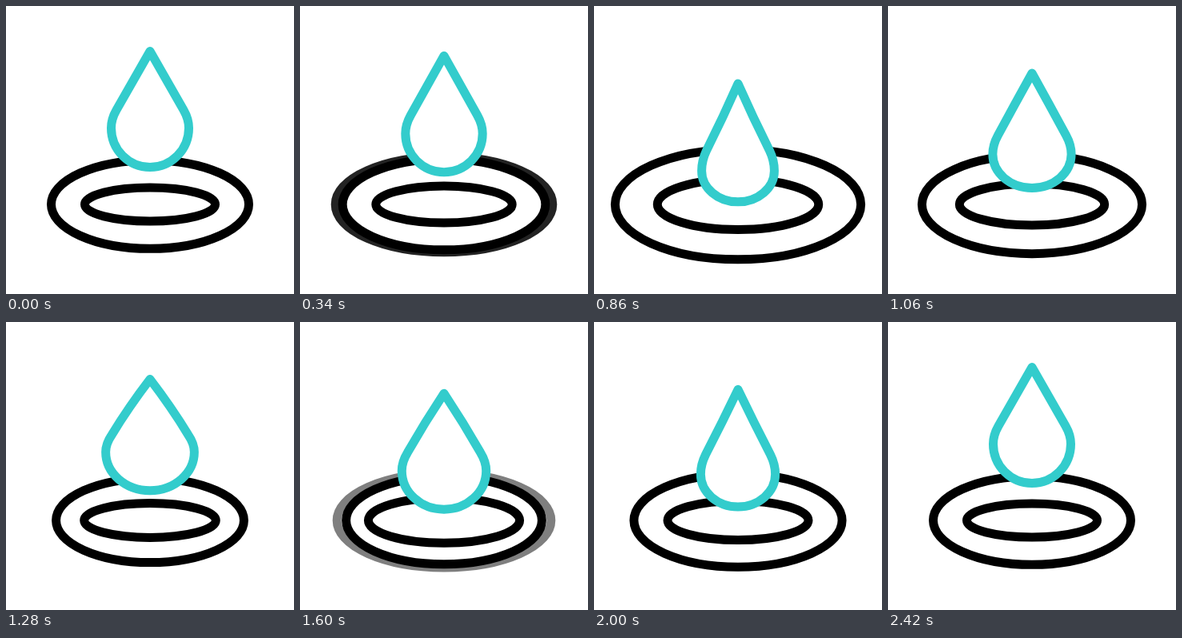
An HTML page with a canvas for the animation above (3 s loop, 360x360 px).

```html
<!DOCTYPE html>
<html lang="en">
<head>
<meta charset="utf-8">
<title>Water drop</title>
<style>
  html, body { margin: 0; width: 100%; height: 100%; overflow: hidden; background: #fff; }
  canvas { display: block; width: 360px; height: 360px; }
</style>
</head>
<body>
<canvas id="stage" width="360" height="360"></canvas>
<script>
const ctx = document.getElementById('stage').getContext('2d');
const SIZE = 360, CX = SIZE / 2, WATER_Y = 248;
const LOOP = 3000, STEP = 20, START = 210, MIDDLE = 1320, END = 2420;
const REST_WIDTH = 48.5;

const smooth = p => p * p * (3 - 2 * p);

function ease(t, t0, t1, a, b) {
  const p = Math.min(1, Math.max(0, (t - t0) / (t1 - t0)));
  return a + (b - a) * smooth(p);
}

// Two bounces from rest and back; a part's lag shifts its peaks, the second one more.
function swing(t, rest, first, dip, second, lag) {
  const peak1 = 800 + lag, peak2 = 1830 + 3 * lag;
  if (t < peak1) return ease(t, START, peak1, rest, first);
  if (t < MIDDLE) return ease(t, peak1, MIDDLE, first, dip);
  if (t < peak2) return ease(t, MIDDLE, peak2, dip, second);
  return ease(t, peak2, END, second, rest);
}

function ring(rx, ry, alpha = 1) {
  ctx.globalAlpha = alpha;
  ctx.strokeStyle = '#000';
  ctx.beginPath();
  ctx.ellipse(CX, WATER_Y, rx, ry, 0, 0, Math.PI * 2);
  ctx.stroke();
  ctx.globalAlpha = 1;
}

// A ring that widens past the outer one while it fades.
function ripple(t, start, radius, power) {
  const p = (t - start) / 560;
  if (p <= 0 || p >= 1) return;
  const rx = radius + 53 * p ** power;
  ring(rx, rx * 0.44, 1 - smooth(p));
}

function drop(tip, belly, bottom, w) {
  const cy = tip + belly, k = 8;
  const dx = w * 0.866, dy = belly * 0.766;
  const lean = k * dx / dy;
  const bow = (w - REST_WIDTH) * 0.4;
  const sideX = dx / 2 + bow, sideY = tip + dy / 2, shoulder = tip + dy;

  ctx.beginPath();
  ctx.moveTo(CX, tip);
  ctx.quadraticCurveTo(CX + sideX, sideY, CX + dx, shoulder);
  ctx.bezierCurveTo(CX + dx + lean, shoulder + k, CX + w, cy - k, CX + w, cy);
  ctx.ellipse(CX, cy, w, bottom - cy, 0, 0, Math.PI);
  ctx.bezierCurveTo(CX - w, cy - k, CX - dx - lean, shoulder + k, CX - dx, shoulder);
  ctx.quadraticCurveTo(CX - sideX, sideY, CX, tip);
  ctx.closePath();
  ctx.fillStyle = '#fff';
  ctx.fill();
  ctx.strokeStyle = '#33cccc';
  ctx.stroke();
}

function draw(t) {
  ctx.fillStyle = '#fff';
  ctx.fillRect(0, 0, SIZE, SIZE);
  ctx.lineWidth = 11;
  ctx.lineJoin = 'round';

  ripple(t, START, 123.5, 1);
  ripple(t, MIDDLE, 117.5, 1.7);

  const outer = swing(t, 123.5, 153.8, 116.7, 130.3, 40);
  const inner = swing(t, 81.5, 103.9, 82, 94.6, -85);
  ring(outer, outer * 0.448);
  ring(inner, 21 + (inner - 81.5) * 0.55);

  const tip = swing(t, 56.5, 98.8, 71.1, 96.7, -25);
  const bottom = swing(t, 201.5, 247.3, 210.1, 244, -25);
  const belly = swing(t, 96, 109, 90.7, 106, 50);
  const width = swing(t, REST_WIDTH, 45.4, 55.6, 46.4, 80);
  drop(tip, belly, bottom, width);
}

function tick() {
  const t = performance.now() % LOOP;
  draw(Math.floor(t / STEP) * STEP);
  requestAnimationFrame(tick);
}
tick();
</script>
</body>
</html>
```
